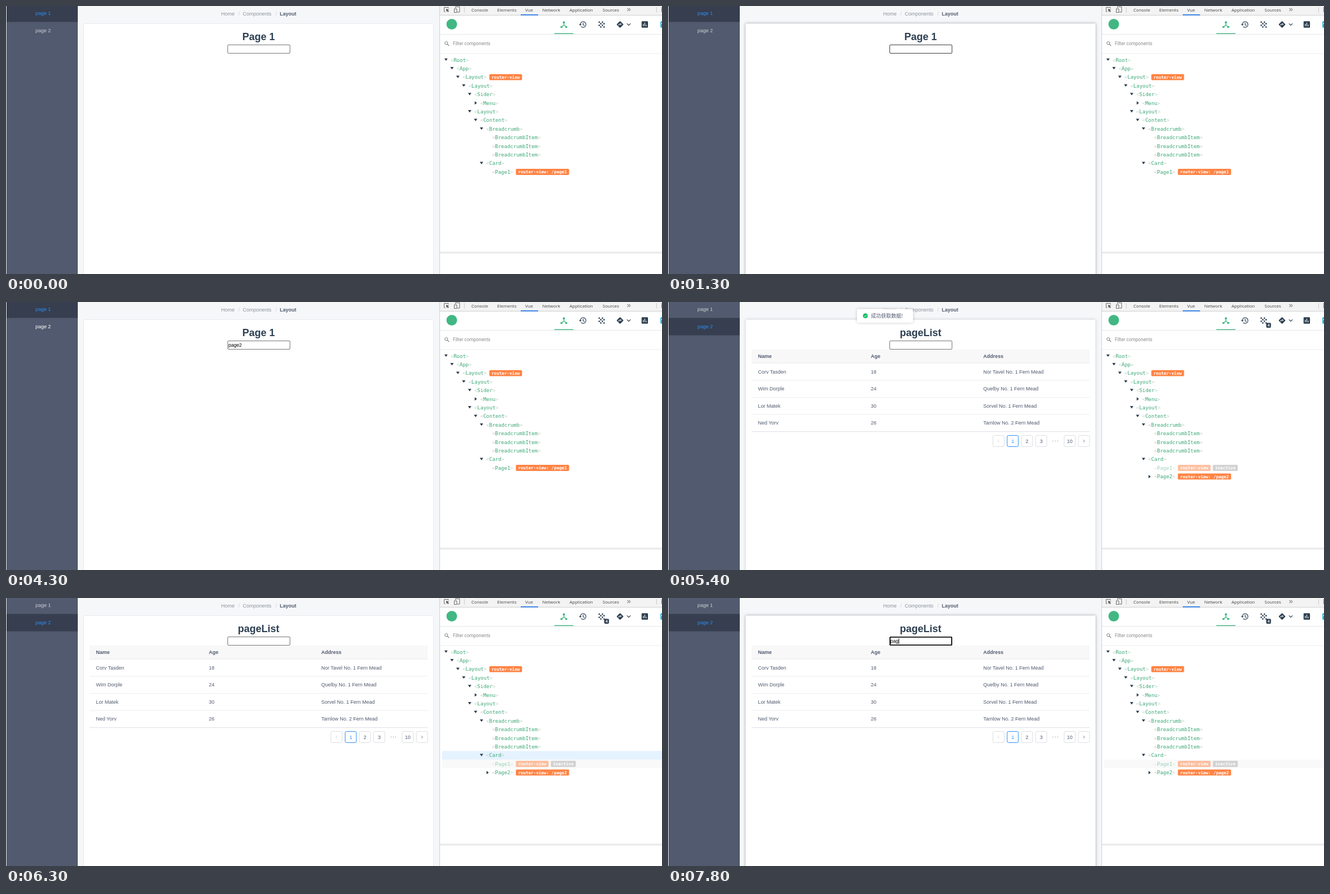
An HTML page for the animation above (8 s loop, 1170x479 px).

```html
<!DOCTYPE html>
<html lang="en">
<head>
<meta charset="utf-8">
<title>Component inspector</title>
<style>
html, body { margin: 0; width: 100%; height: 100%; overflow: hidden; background: #fff; }
svg { display: block; width: 100vw; height: 100vh; }
text { font: 9px "Liberation Sans", Arial, sans-serif; white-space: pre; }
.bold { font-weight: 700; }
.title { font-size: 18px; font-weight: 700; fill: #2c3e50; }
.input { font-size: 8.6px; fill: #000; }
.tab { font: 8px "Open Sans", "Noto Sans", sans-serif; fill: #444; }
.filter { font: 8.3px Roboto, sans-serif; fill: #8a8a8a; }
.node { font: 9px "DejaVu Sans Mono", monospace; fill: #3ba776; }
.dim { fill: #c3cfc9; }
.badge { font: 700 7.6px "DejaVu Sans Mono", monospace; fill: #fff; }
.tag { font: 6.5px "Liberation Mono", monospace; fill: #fff; }
.toast { font: 9px "Noto Sans CJK SC", "Noto Sans CJK", sans-serif; fill: #515a6e; }
#shadow { filter: drop-shadow(0 .6px 2.5px rgba(0,0,0,.3)); }
#toast rect { filter: drop-shadow(0 .6px 2.5px rgba(0,0,0,.22)); }
</style>
</head>
<body>
<svg id="stage" viewBox="0 0 1170 479" preserveAspectRatio="none"></svg>
<script>
const LOOP = 8000;
const INK = '#2c3e50', GREEN = '#41b883', BLUE = '#2d8cf0', ORANGE = '#ff8344';

const rect = (x, y, w, h, fill, extra = '') =>
  `<rect x="${x}" y="${y}" width="${w}" height="${h}" fill="${fill}" ${extra}/>`;
const text = (x, y, str, fill = '', cls = '', extra = '') =>
  `<text x="${x}" y="${y}" ${fill && `fill="${fill}"`} class="${cls}" ${extra}>${str}</text>`;
const path = (d, stroke = INK, w = 1, fill = 'none', extra = '') =>
  `<path d="${d}" stroke="${stroke}" stroke-width="${w}" fill="${fill}" ${extra}/>`;
const group = (id, body, extra = '') => `<g id="${id}" ${extra}>${body}</g>`;
const middle = 'text-anchor="middle"';

// ---- application page ----
function sidebar() {
  return rect(1, 0, 127, 479, '#515a6e') +
    rect(1, 0, 127, 28.5, '#363e4f', 'id="active"') +
    text(66.2, 16, 'page 1', '', '', `id="menu1" ${middle}`) +
    text(66.2, 47, 'page 2', '', '', `id="menu2" ${middle}`);
}

function breadcrumb() {
  return text(383.7, 17, 'Home', '#8d939f') + text(414.5, 17, '/', '#cdd0d6') +
    text(422.3, 17, 'Components', '#8d939f') + text(480.5, 17, '/', '#cdd0d6') +
    text(488.3, 17, 'Layout', '#515a6e', 'bold');
}

function table() {
  const columns = [160.4, 361.7, 562.2];
  const rows = [
    ['Corv Tasden', 18, 'Nor Tavel No. 1 Fern Mead'],
    ['Wim Dorple', 24, 'Quelby No. 1 Fern Mead'],
    ['Lor Matek', 30, 'Sorvel No. 1 Fern Mead'],
    ['Ned Yorv', 26, 'Tamlow No. 2 Fern Mead'],
  ];
  let out = rect(149, 85, 603, 24, '#f8f8f9') + rect(149, 108.7, 603, .8, '#e3e5e8');
  ['Name', 'Age', 'Address'].forEach((s, c) => out += text(columns[c], 100, s, '#515a6e', 'bold'));
  rows.forEach((row, r) => {
    row.forEach((s, c) => out += text(columns[c], 127.6 + 30.6 * r, s, '#515a6e'));
    out += rect(149, 139.5 + 30.6 * r, 603, .8, r === 3 ? '#d5d8dd' : '#e6e8eb');
  });
  return out;
}

function pager() {
  const labels = ['', '1', '2', '3', '•••', '10', ''];
  let out = '';
  labels.forEach((label, i) => {
    const x = 579.5 + 25.4 * i, mid = x + 10;
    const color = i === 1 ? BLUE : '#515a6e';
    if (i === 4) {
      for (const d of [-4, 0, 4]) out += `<circle cx="${mid - .3 + d}" cy="248.5" r="1" fill="#c5c8ce"/>`;
      return;
    }
    out += rect(x, 238.5, 20, 20, '#fff', `rx="2.5" stroke="${i === 1 ? BLUE : '#dcdee2'}"`);
    out += text(mid, 251.7, label, color, '', middle);
    if (i === 0) out += path(`M${mid + 1} 246.3l-2 2.2l2 2.2`, '#c5c8ce', .9);
    if (i === 6) out += path(`M${mid - 1} 246.3l2 2.2l-2 2.2`, '#515a6e', .9);
  });
  return out;
}

function card() {
  return rect(138, 31, 625, 470, '#fff', 'rx="2.5" id="shadow"') +
    rect(138.5, 31.5, 624, 470, '#fff', 'rx="2.5" stroke="#e8ebee"') +
    text(450.5, 61, '', '', 'title', `id="title" ${middle}`) +
    rect(395.5, 69.5, 111, 15, '#fff', 'rx="1.5" id="box"') +
    rect(396, 69.8, 110, 14.4, 'none', 'rx="1.3" stroke="#101010" stroke-width="1.8" id="focus"') +
    text(396.7, 79.6, '', '', 'input', 'id="typed"') +
    rect(397, 72, .9, 10, '#000', 'id="caret"') +
    group('list', table() + pager());
}

function toast() {
  return group('toast', rect(337, 12.5, 100, 24.5, '#fff', 'rx="2.5"') +
    '<circle cx="352" cy="24.7" r="4.4" fill="#19be6b"/>' +
    path('M349.9 24.8l1.5 1.5l2.7-2.9', '#fff', .9) +
    text(362, 28, '成功获取数据!', '', 'toast'));
}

function overlay(id, name, x, y, w, labelY) {
  const mid = x + w / 2, width = (name.length + 2) * 3.9 + 3;
  return group(id, rect(x, y, w, 479 - y, 'rgb(104,182,255)', 'opacity=".35"') +
    rect(mid - width / 2, labelY, width, 13.5, '#73bbff', 'rx="1.5"') +
    text(mid, labelY + 8.9, `<tspan opacity=".6">&lt;</tspan>${name}<tspan opacity=".6">&gt;</tspan>`, '', 'tag', middle));
}

// ---- inspector ----
const ROW = 15.4, rowY = i => 96.3 + ROW * i;
const NODES = [
  ['Root', 0], ['App', 1], ['Layout', 2, 'router-view'], ['Layout', 3], ['Sider', 4],
  ['Menu', 5], ['Layout', 4], ['Content', 5], ['Breadcrumb', 6], ['BreadcrumbItem', 7],
  ['BreadcrumbItem', 7], ['BreadcrumbItem', 7], ['Card', 6],
];

function badge(x, y, label, fill = ORANGE) {
  const w = label.length * 4.575 + 8;
  return rect(x, y - 5.4, w, 10.8, fill, 'rx="1.6"') + text(x + 4, y + 2.8, label, '', 'badge');
}

function node(i, name, depth, label, arrow = '') {
  const x = 793 + 10.55 * depth, y = rowY(i), ax = x - 8.2;
  let out = text(x, y + 3.2, `<tspan class="dim">&lt;</tspan>${name}<tspan class="dim">&gt;</tspan>`, '', 'node');
  if (arrow === 'down') out += path(`M${ax - 3} ${y - 2.6}h6l-3 4.4z`, 'none', 0, INK);
  if (arrow === 'right') out += path(`M${ax - 1.6} ${y - 3}v6l4-3z`, 'none', 0, INK);
  if (label) out += badge(x + (name.length + 2) * 5.418 + 4.6, y, label);
  return out;
}

function tree() {
  const rows = NODES.map(([name, depth, label], i) =>
    node(i, name, depth, label, name === 'Menu' ? 'right' : depth === 7 ? '' : 'down')).join('');
  return rect(778, rowY(13) - 7.7, 392, ROW, '#f9f9f9', 'id="faint"') +
    rect(778, 0, 392, ROW, '#e5f2ff', 'id="hover"') + rows +
    group('tree1', node(13, 'Page1', 7, 'router-view: /page1')) +
    group('tree2', group('idle', node(13, 'Page1', 7, 'router-view'), 'opacity=".5"') +
      badge(971.7, rowY(13), 'inactive', '#d2d2d2') +
      node(14, 'Page2', 7, 'router-view: /page2', 'right'));
}

function tabs() {
  const labels = [[830, 'Console'], [876, 'Elements'], [926, 'Vue'], [956.5, 'Network'],
    [1005, 'Application'], [1064, 'Sources']];
  return rect(774, 0, 396, 16, '#f3f3f3') + rect(774, 16, 396, 1, '#d0d0d0') +
    labels.map(([x, s]) => text(x, 9.6, s, '', 'tab')).join('') +
    rect(918, 15, 31, 1.6, '#1a73e8') + rect(817, 2, 1, 10, '#ccc') + rect(1160, 2, 1, 10, '#ccc') +
    path('M789 4.5v-2h-7.500v7.500h2', '#5a5a5a', .9) + path('M785 5l5 2l-2 .9l1.700 2l-1 .9l-1.700-2l-1 1.600z', '#5a5a5a', .3, '#5a5a5a') +
    path('M801.500 3.500v-2h7.500v9.500h-4M799.500 5h4.500v6.500h-4.500z', '#5a5a5a', .9) +
    path('M1108.300 4l2.200 2.500l-2.200 2.500M1111.300 4l2.200 2.500l-2.200 2.500', '#444', 1) +
    [3.5, 6.5, 9.5].map(y => `<circle cx="1169.500" cy="${y}" r=".9" fill="#5a5a5a"/>`).join('');
}

function toolbar() {
  let dots = '';
  for (let r = 0; r < 4; r++) for (let c = 0; c < 4; c++)
    if ((r + c) % 2 === 0) dots += `<circle cx="${1058 + 2.9 * c}" cy="${28.8 + 2.9 * r}" r="1.35" fill="${INK}"/>`;
  return `<circle cx="795" cy="32.5" r="9.5" fill="${GREEN}"/>` +
    `<circle cx="995" cy="29.300" r="2" fill="${GREEN}"/>` + path('M995 30v3.800l-4 3.700M995 33.800l4 3.700', GREEN, 1.3) +
    rect(989, 36, 3.5, 3, GREEN) + rect(997.5, 36, 3.5, 3, GREEN) + rect(978, 48.6, 34, 1.6, GREEN) +
    path('M1024.400 33a5 5 0 1 1 1.600 3.700M1029.300 30v3.400l2.500 1.500', INK, 1.2) +
    path('M1021.800 32.500h5l-2.500 2.800z', 'none', 0, INK) + dots +
    rect(1090.8, 28.6, 8.8, 8.8, INK, 'rx="1" transform="rotate(45 1095.200 33)"') +
    path('M1093 35v-2.500h4M1095.600 30.700l1.800 1.800l-1.800 1.800', '#fff', 1) +
    path('M1107.500 31.300l3.200 3.200l3.200-3.200', INK, 1.2) +
    rect(1133.6, 27.3, 11.4, 11.4, INK, 'rx="1.300"') +
    path('M1136.700 36v-4M1139.300 36v-6.300M1141.900 36v-2.500', '#fff', 1.1) +
    rect(1167.2, 27.3, 8, 11.4, '#1fb6e8', 'rx="1.300"') + rect(1169, 30, 1, 2, '#fff') +
    rect(774, 50, 396, 1, '#e6e8ea') +
    group('count', rect(1067, 37.3, 8.4, 8.8, INK, 'rx="2"') + text(1071.2, 44.4, '4', '#fff', 'bold', `${middle} style="font-size:7px"`));
}

function inspector() {
  return rect(773, 0, 397, 479, '#fff') + rect(773, 0, 1, 479, '#cfcfcf') + tabs() + toolbar() +
    '<circle cx="785.300" cy="66.300" r="2.600" fill="none" stroke="#777"/>' + path('M787.200 68.200l3 3', '#777', 1.2) +
    text(797, 70, 'Filter components', '', 'filter') + rect(774, 84.5, 396, 1, '#eceeef') +
    tree() + rect(774, 439, 396, 3.5, '#ececec');
}

const stage = document.getElementById('stage');
stage.innerHTML = rect(0, 0, 773, 479, '#f5f7f9') + rect(0, 0, 1, 479, '#e9ebee') +
  sidebar() + breadcrumb() + card() +
  overlay('rootArea', 'Root', 0, 0, 774, 289.6) +
  overlay('appArea', 'App', 0, 0, 774, 289.6) +
  overlay('pageArea', 'Page2', 149, 42, 603, 301) +
  toast() + inspector();

// ---- timeline: [start ms, value] ----
const SWITCH = 4500;
const TRACKS = {
  area: [[0, ''], [400, 'rootArea'], [500, 'appArea'], [600, ''], [5600, 'pageArea'], [5700, '']],
  row: [[0, -1], [400, 1], [500, -1], [5500, 14], [5700, 13], [6300, 12], [6400, -1]],
  shadow: [[0, 0], [600, .5], [700, 1], [3900, .6], [4000, .3], [4100, 0], [5000, 1], [5400, .5], [5500, 0], [6400, .5], [6500, 1]],
  box: [[0, '#767676'], [1300, '#3c3c3c'], [4300, '#767676'], [6900, '#3c3c3c']],
  focus: [[0, 0], [1500, 1], [4300, 0], [7000, 1]],
  caret: [[0, 0], [1500, 1], [2000, 0], [2200, 1], [3400, 0], [3900, 1], [4300, 0], [7000, 1], [7500, 0], [7700, 1]],
  typed: [[0, ''], [2200, 'p'], [2300, 'pa'], [2400, 'pag'], [2500, 'page'], [2900, 'page2'], [SWITCH, ''], [7700, 'pa'], [7800, 'pag']],
  toast: [[0, 0], [4600, .3], [4700, .75], [4800, 1], [5900, .7], [6000, .3], [6100, 0]],
};
const at = (name, t) => TRACKS[name].findLast(([start]) => start <= t)[1];
const el = Object.fromEntries([...stage.querySelectorAll('[id]')].map(e => [e.id, e]));
const set = (id, key, value) => el[id].setAttribute(key, value);
const show = (id, on) => set(id, 'opacity', +on);

function render(t) {
  const second = t >= SWITCH, idle = '#cbcdd3';
  set('active', 'y', second ? 28.5 : 0);
  set('active', 'height', second ? 31 : 28.5);
  set('menu1', 'fill', second ? idle : BLUE);
  set('menu2', 'fill', second ? BLUE : t >= 3900 ? '#fff' : idle);
  el.title.textContent = second ? 'pageList' : 'Page 1';
  for (const id of ['list', 'tree2', 'count']) show(id, second);
  show('tree1', !second);
  show('faint', t >= 5700);

  const area = at('area', t);
  for (const id of ['rootArea', 'appArea', 'pageArea']) show(id, id === area);
  const row = at('row', t);
  show('hover', row >= 0);
  set('hover', 'y', rowY(row) - ROW / 2);

  show('shadow', at('shadow', t));
  set('box', 'stroke', at('box', t));
  show('focus', at('focus', t));
  el.typed.textContent = at('typed', t);
  show('caret', at('caret', t));
  set('caret', 'x', 397 + el.typed.getComputedTextLength());

  const seen = at('toast', t);
  show('toast', seen);
  set('toast', 'transform', `translate(0 ${(seen - 1) * 25})`);
}

const start = performance.now();
function tick() {
  render((performance.now() - start) % LOOP);
  requestAnimationFrame(tick);
}
tick();
</script>
</body>
</html>
```
